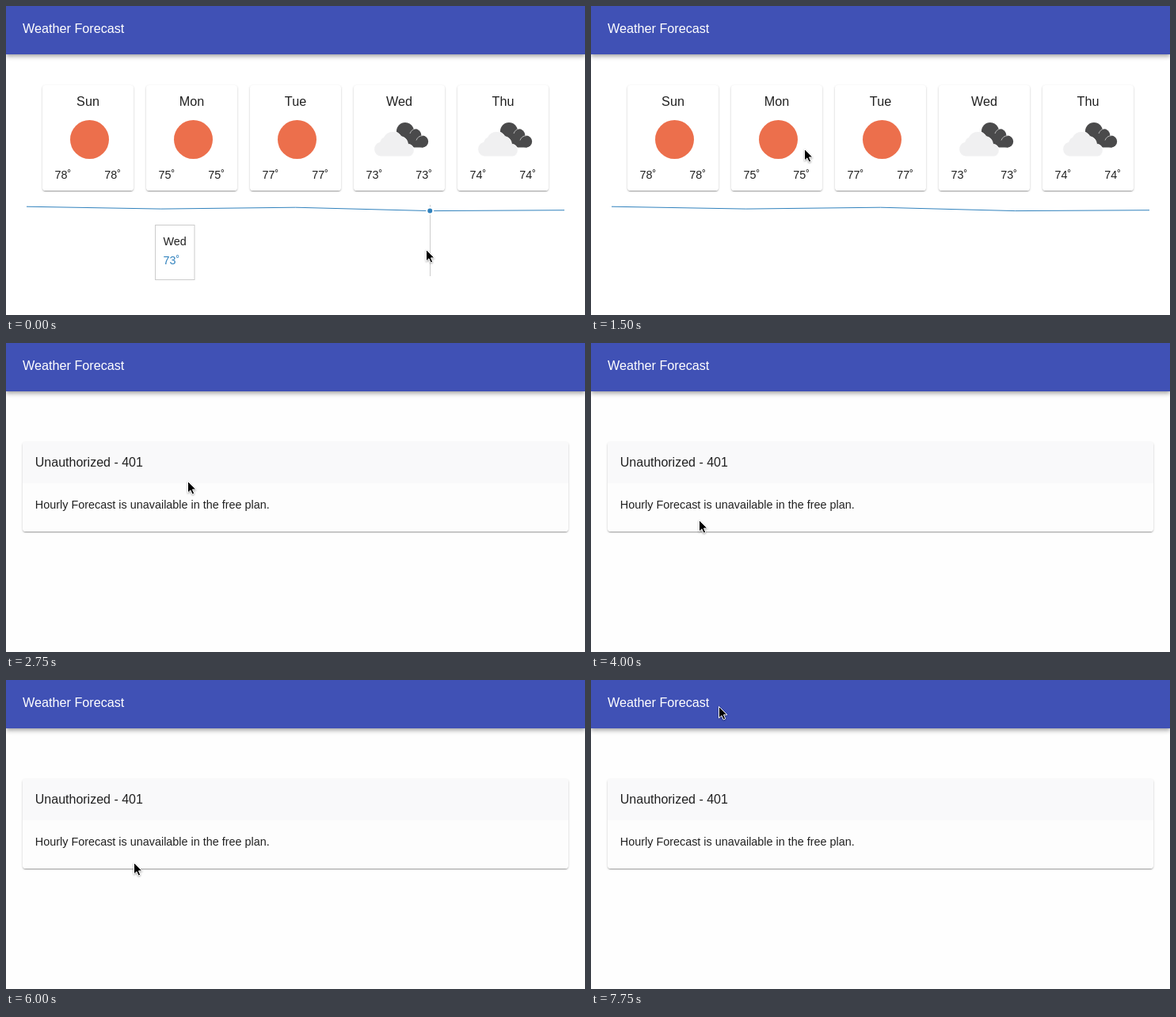
An HTML page that plays this animation: 731 px wide and 390 px high, repeating every 8000 ms.

```html
<!DOCTYPE html>
<html lang="en">
<head>
<meta charset="utf-8">
<title>Weather Forecast</title>
<style>
  html, body { margin: 0; width: 100%; height: 100%; overflow: hidden; background: #fff; }
  #stage { position: relative; width: 731px; height: 390px; overflow: hidden; background: #fff; }
  #stage.failed { background: #fefefe; }
  svg { position: absolute; left: 0; top: 0; width: 731px; height: 390px; }
  text { font-family: "Liberation Sans", Arial, sans-serif; font-size: 14.4px; fill: #212121; }
  .big { font-size: 16.2px; }
  .mid { text-anchor: middle; }
  .end { text-anchor: end; }
  .bar {
    position: absolute; left: 0; top: 0; width: 731px; height: 61px; background: #4051b5;
    box-shadow: 0 2px 4px -1px rgba(0,0,0,.2), 0 3.6px 4.5px rgba(0,0,0,.14), 0 1px 9px rgba(0,0,0,.12);
  }
  .card {
    position: absolute; top: 100px; width: 115px; height: 133px; border-radius: 3.6px; background: #fff;
    box-shadow: 0 .9px 2.7px rgba(0,0,0,.2), 0 .9px .9px rgba(0,0,0,.14), 0 1.8px .9px -.9px rgba(0,0,0,.12);
  }
  .error { left: 21px; top: 125px; width: 689px; height: 113px; background: #fdfdfd; overflow: hidden; }
  .error::before { content: ""; display: block; height: 52px; background: #f9f9fa; }
</style>
</head>
<body>
<div id="stage">
  <div class="bar"></div>
  <div id="forecast">
    <svg id="week">
      <defs>
        <circle id="sun" cx="59.5" cy="68.5" r="24.5" fill="#ec6f4c"/>
        <g id="clouds">
          <g fill="#4a4a4b">
            <circle cx="65" cy="58" r="11"/>
            <circle cx="77" cy="63.5" r="8.5"/>
            <circle cx="86.7" cy="71" r="7.5"/>
            <path d="M62 60H80L88 78.5H62Z"/>
          </g>
          <path d="M71 61Q73 55.5 78 55M79 69.5Q81 64 87 63.6" fill="none" stroke="#fff" stroke-width=".6"/>
          <path d="M34 90A9.4 9.4 0 0 1 33 71.5A8.2 8.2 0 0 1 38 65.5A12.5 12.5 0 0 1 60 64.5A11 11 0 0 1 68.5 74.2A8 8 0 0 1 70 90Z"
                fill="#f0f0f1" stroke="#fff" stroke-width=".8"/>
        </g>
      </defs>
    </svg>
    <svg>
      <path id="line" fill="none" stroke="#3182bd"/>
      <g id="hover">
        <path id="rule" d="M.5 251V341" stroke="#ccc"/>
        <circle id="dot" r="4" fill="#3182bd" stroke="#fff" stroke-width="2"/>
        <g id="tip">
          <rect x=".5" y="276.5" width="49.5" height="69" fill="#fff" stroke="#ccc"/>
          <text id="day" x="10.5" y="302"></text>
          <text id="temp" x="10.5" y="326" style="fill:#3182bd"></text>
        </g>
      </g>
    </svg>
  </div>
  <div id="error">
    <div class="card error"></div>
    <svg>
      <text class="big" x="36.8" y="156" style="font-size:16px">Unauthorized - 401</text>
      <text x="36.8" y="209">Hourly Forecast is unavailable in the free plan.</text>
    </svg>
  </div>
  <svg>
    <text class="big" x="21" y="34" style="fill:#fff">Weather Forecast</text>
    <g id="pointer" style="filter:drop-shadow(0 1px .8px rgba(0,0,0,.35))">
      <path d="M1.5 1.5V16L4.9 12.9L7.2 18L9.7 16.9L7.5 11.9H11.9Z" stroke="#fff" stroke-linejoin="round"/>
    </g>
  </svg>
</div>
<script>
const LOOP = 8000, FRAME = 250, ERROR_AT = 2750, CHART_TOP = 245;
const $ = id => document.getElementById(id);

const days = [
  ['Sun', 78, 'sun'], ['Mon', 75.1, 'sun'], ['Tue', 77, 'sun'],
  ['Wed', 72.6, 'clouds'], ['Thu', 73.5, 'clouds']
];
const chartX = i => 26 + 169.75 * i;
const chartY = i => 331.2 - days[i][1];
const degrees = i => Math.round(days[i][1]) + '˚';

// Moves: start, end, ease-out power, goal
const pointerMoves = [
  [0, 0, 1, 529, 306],
  [250, 750, 4, 149, 302],
  [750, 1250, .6, 212, 176],
  [1250, 1750, .6, 377, 184],
  [1750, 2000, 1, 355, 182],
  [2000, 2500, 4, 228, 173],
  [3750, 4000, 1, 135, 222],
  [4000, 4500, 2, 53, 230],
  [5250, 6000, 1.3, 160, 229],
  [6250, 7000, 2, 243, 228],
  [7000, 7250, 1, 287, 238],
  [7250, 7500, 1, 376, 216],
  [7500, 7750, 1, 160, 32]
];
const tipMoves = [[0, 0, 1, 188], [0, 250, 1, 526], [250, 750, .64, 211]];

function follow(moves, t) {
  let at = moves[0].slice(3);
  for (const [start, end, power, ...goal] of moves) {
    if (t <= start) break;
    const u = Math.min(1, (t - start) / (end - start));
    const eased = 1 - (1 - u) ** power;
    at = at.map((v, i) => v + (goal[i] - v) * eased);
  }
  return at.map(Math.round);
}

days.forEach(([name, , icon], i) => {
  const x = 46 + 131 * i;
  $('forecast').insertAdjacentHTML('afterbegin', `<div class="card" style="left:${x}px"></div>`);
  $('week').insertAdjacentHTML('beforeend', `<g transform="translate(${x} 100)">
    <text class="big mid" x="57.5" y="26">${name}</text>
    <use href="#${icon}"/>
    <text x="15.5" y="118">${degrees(i)}</text>
    <text class="end" x="99" y="118">${degrees(i)}</text></g>`);
});
$('line').setAttribute('d', 'M' + days.map((_, i) => `${chartX(i)} ${chartY(i)}`).join('L'));

const show = (id, on) => { $(id).style.display = on ? '' : 'none'; };
const move = (id, x, y) => $(id).setAttribute('transform', `translate(${x} ${y})`);

function draw(t) {
  const failed = t >= ERROR_AT;
  show('forecast', !failed);
  show('error', failed);
  $('stage').classList.toggle('failed', failed);

  const [x, y] = follow(pointerMoves, t);
  move('pointer', x, y);

  // The chart highlights the day nearest the pointer.
  const hovering = !failed && y > CHART_TOP;
  show('hover', hovering);
  if (!hovering) return;
  const i = Math.round((x - chartX(0)) / (chartX(1) - chartX(0)));
  move('rule', Math.floor(chartX(i)), 0);
  move('dot', chartX(i), chartY(i));
  move('tip', follow(tipMoves, t)[0], 0);
  $('day').textContent = days[i][0];
  $('temp').textContent = degrees(i);
}

const start = performance.now();
function tick() {
  const t = (performance.now() - start) % LOOP;
  draw(Math.floor(t / FRAME) * FRAME);
  requestAnimationFrame(tick);
}
tick();
</script>
</body>
</html>
```
